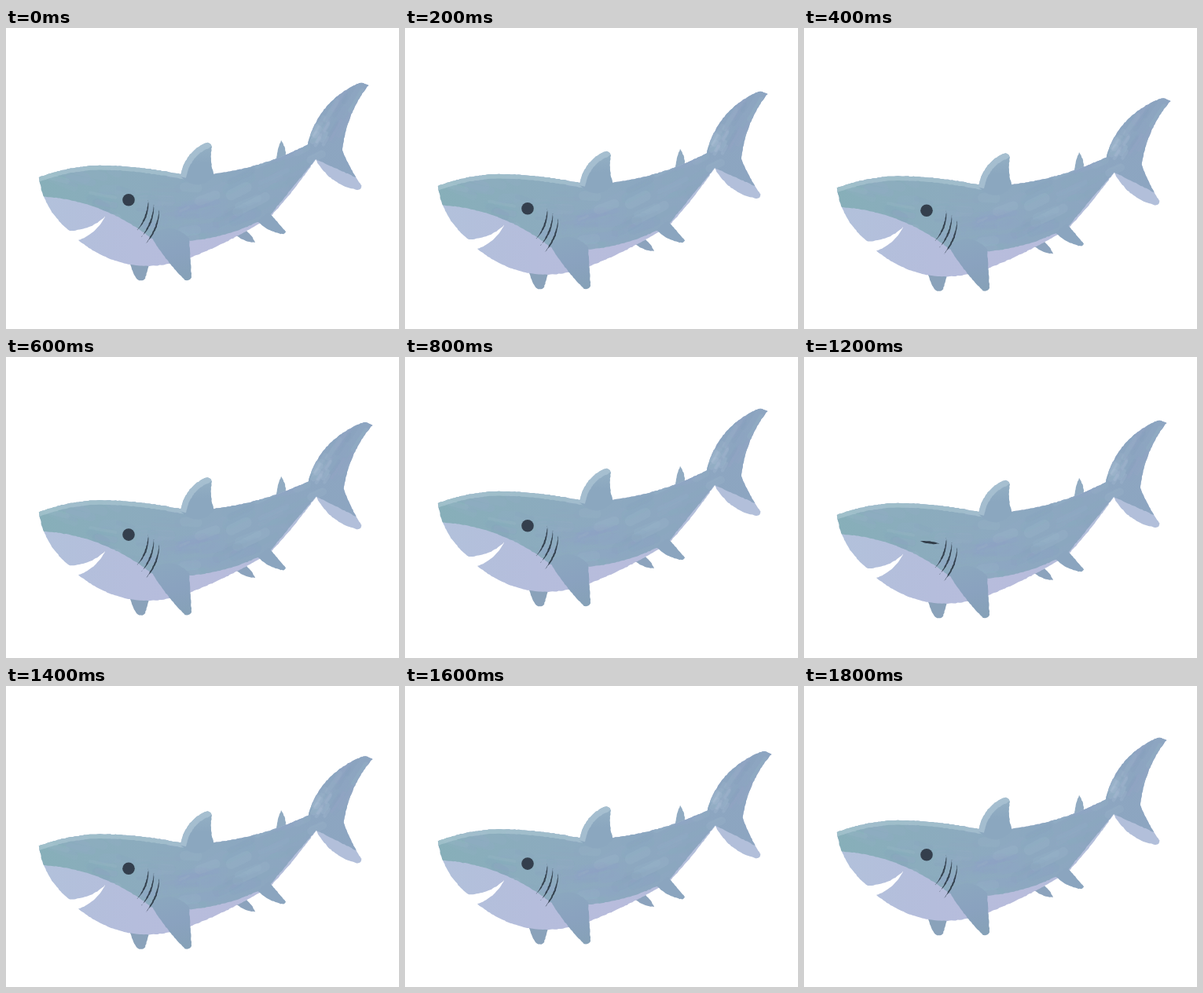
These frames come from a looping animation (500x383 px, 2 s). An HTML page with a canvas:

```html
<!DOCTYPE html>
<html lang="en">
<head>
<meta charset="utf-8">
<title>Swimming shark</title>
<style>
  html, body { margin: 0; width: 500px; height: 383px; overflow: hidden; background: #fff; }
  canvas { display: block; }
</style>
</head>
<body>
<canvas id="stage" width="500" height="383"></canvas>
<script>
const ctx = document.getElementById('stage').getContext('2d');
const STEP = 200, STEPS = 10, BLINK = 6;
const BOB = [0, 11, 13.5, 7.3, -4];
const TINTS = ['#b0cdd6', '#7893b4', '#a2a8cf', '#7fabb5', '#8c9cc0'];
let bob = 0, curl = 0;

// Corners are [x, y, bulge]: the edge to the next corner bows left of its direction by bulge.
const SPINE = [[42, 190, 4.5], [132, 175, 2], [232, 188, -9]];
const BODY = [
  ...SPINE,
  [384, 148, 12], [447, 71, 2], [461, 73, -6.5], [428, 156, -1.5],
  [452, 200, 2], [447, 206, 8], [394, 167, 2], [336, 240, 3],
  [235, 292, 20.5], [92, 270, -4.5], [126, 240, 4.7], [81, 258, 8]
];
const BACK = [
  [38, 214, 13], [185, 268, -2], [240, 270, -5.5], [336, 238, 0],
  [394, 167, 0], [500, 215, 0], [500, 50, 0], [20, 50, 0]
];
const DORSAL = [[222, 189, 6.5], [252, 147, 3], [262, 151, -2.5], [265, 188, 11]];
const BACK_FIN = [[344, 167, 1], [350, 143, 2], [356, 165, 0]];
const PECTORAL = [[184, 264, -2.5], [228, 321, -2], [236, 317, 0], [233, 268, -11]];
const PELVIC = [[158, 300, -1], [167, 320, -2], [177, 319, 0], [182, 301, 0]];
const REAR_FIN = [[320, 246, -2.5], [350, 262, -2], [356, 259, 0], [334, 234, 0]];
const FAR_FIN = [[293, 264, -2], [317, 273, -1], [306, 258, 0]];

// The whole body bobs while the tail curls away from it.
function bend(x, y) {
  const reach = Math.max(0, (x - 240) / 215);
  const lean = Math.max(0, Math.min(1, (x - 360) / 60));
  return [x + curl * lean * (200 - y) / 160, y + bob + curl * reach * reach];
}

function seeded(seed) {
  return () => {
    seed = (seed * 16807) % 2147483647;
    return seed / 2147483647;
  };
}

function trace(corners, closed = true) {
  const rnd = seeded(4217), path = new Path2D();
  const edges = closed ? corners.length : corners.length - 1;
  for (let i = 0; i < edges; i++) {
    const [x, y, bulge] = corners[i], [nx, ny] = corners[(i + 1) % corners.length];
    const dx = nx - x, dy = ny - y, length = Math.hypot(dx, dy);
    const count = Math.max(3, Math.ceil(length / 2.5));
    for (let j = 0; j <= count; j++) {
      const t = j / count, bow = 4 * t * (1 - t) * bulge / length;
      const [px, py] = bend(x + dx * t + dy * bow, y + dy * t - dx * bow);
      path.lineTo(px + (rnd() - 0.5) * 0.7, py + (rnd() - 0.5) * 0.7);
    }
  }
  if (closed) path.closePath();
  return path;
}

function fill(corners, color) {
  ctx.fillStyle = color;
  ctx.fill(trace(corners));
}

function within(paths, paint) {
  ctx.save();
  paths.forEach(path => ctx.clip(path));
  paint();
  ctx.restore();
}

function stroke(path, width, color, alpha) {
  ctx.globalAlpha = alpha;
  ctx.strokeStyle = color;
  ctx.lineWidth = width;
  ctx.stroke(path);
  ctx.globalAlpha = 1;
}

function gradient(x0, y0, x1, y1, ...colors) {
  const g = ctx.createLinearGradient(...bend(x0, y0), ...bend(x1, y1));
  colors.forEach((c, i) => g.addColorStop(i / (colors.length - 1), c));
  return g;
}

function brushwork() {
  const rnd = seeded(90731);
  const tint = () => TINTS[Math.floor(rnd() * TINTS.length)];
  const dab = (x, y, dx, dy, width, color, alpha) =>
    stroke(trace([[x, y, 0], [x + dx, y + dy, 0]], false), width, color, alpha);
  const flow = x => 208 + 24 * Math.sin((x - 60) / 85) - Math.max(0, x - 240) * 0.22;
  ctx.lineCap = 'round';
  for (let i = 0; i < 130; i++) {
    const x = 45 + rnd() * 350, dx = 8 + rnd() * 28, off = (rnd() - 0.5) * 90;
    dab(x, flow(x) + off, dx, flow(x + dx) - flow(x) + (rnd() - 0.5) * 8,
      3 + rnd() * 11, tint(), 0.05 + rnd() * 0.08);
  }
  for (let i = 0; i < 24; i++) {
    const x = 170 + rnd() * 130;
    dab(x, 222 + rnd() * 40, 20, -4, 6 + rnd() * 8, '#8b9bc0', 0.09);
  }
  for (let i = 0; i < 26; i++) {
    const t = rnd() * 0.75, side = (rnd() - 0.5) * 34;
    dab(398 + 52 * t + side, 152 - 80 * t + side * 0.4, 14, -24, 2 + rnd() * 6, tint(), 0.1);
  }
  for (let i = 0; i < 8; i++) {
    dab(390 + rnd() * 16, 128 + rnd() * 22, 5, -9, 3 + rnd() * 5, '#c0cee0', 0.14);
  }
}

function drawBody() {
  const body = trace(BODY);
  ctx.fillStyle = gradient(50, 230, 390, 230, '#b2c1db', '#b5bddc', '#b8bcdc', '#b2bfda');
  ctx.fill(body);
  within([body, trace(BACK)], () => {
    ctx.fillStyle = gradient(42, 200, 460, 200, '#87afb9', '#8bacbd', '#8da9c0', '#8ca6c0', '#8da5c1');
    ctx.fillRect(0, 0, 500, 383);
    brushwork();
    stroke(trace(SPINE, false), 11, '#b5cfda', 0.5);
  });
}

function drawFins() {
  fill(DORSAL, gradient(240, 147, 244, 199, '#94b0c4', '#8ba7bf', '#8ba7bf'));
  within([trace(DORSAL)], () => stroke(trace(DORSAL.slice(0, 3), false), 15, '#adc5d4', 0.75));
  fill(PECTORAL, gradient(205, 255, 220, 320, '#8ba7bf', '#8aa2bf', '#86a1b8'));
  fill(REAR_FIN, '#8ba5bf');
}

function drawGills() {
  for (let i = 0; i < 3; i++) {
    fill([[181 + 7 * i, 219 + 6 * i, 5], [167 + 5.5 * i, 257 + 8.5 * i, -3]], '#35424f');
  }
}

function drawEye(closed) {
  if (closed) {
    fill([[148, 223.5, 1.7], [172, 226.5, 1.7]], '#313c48');
    return;
  }
  const [x, y] = bend(156, 218.8);
  ctx.fillStyle = '#343f4d';
  ctx.beginPath();
  ctx.arc(x, y, 7.8, 0, 2 * Math.PI);
  ctx.fill();
}

function draw(step) {
  const beat = step % BOB.length;
  bob = BOB[beat];
  curl = beat === 2 || beat === 3 ? 6.3 : 0;
  ctx.fillStyle = '#fff';
  ctx.fillRect(0, 0, 500, 383);
  fill(PELVIC, '#8aa2ba');
  fill(FAR_FIN, '#8ca3bd');
  fill(BACK_FIN, '#91abc2');
  drawBody();
  drawFins();
  drawGills();
  drawEye(step === BLINK);
}

let shown = -1;
function tick() {
  const step = Math.floor(performance.now() / STEP) % STEPS;
  if (step !== shown) draw(shown = step);
  requestAnimationFrame(tick);
}
tick();
</script>
</body>
</html>
```
